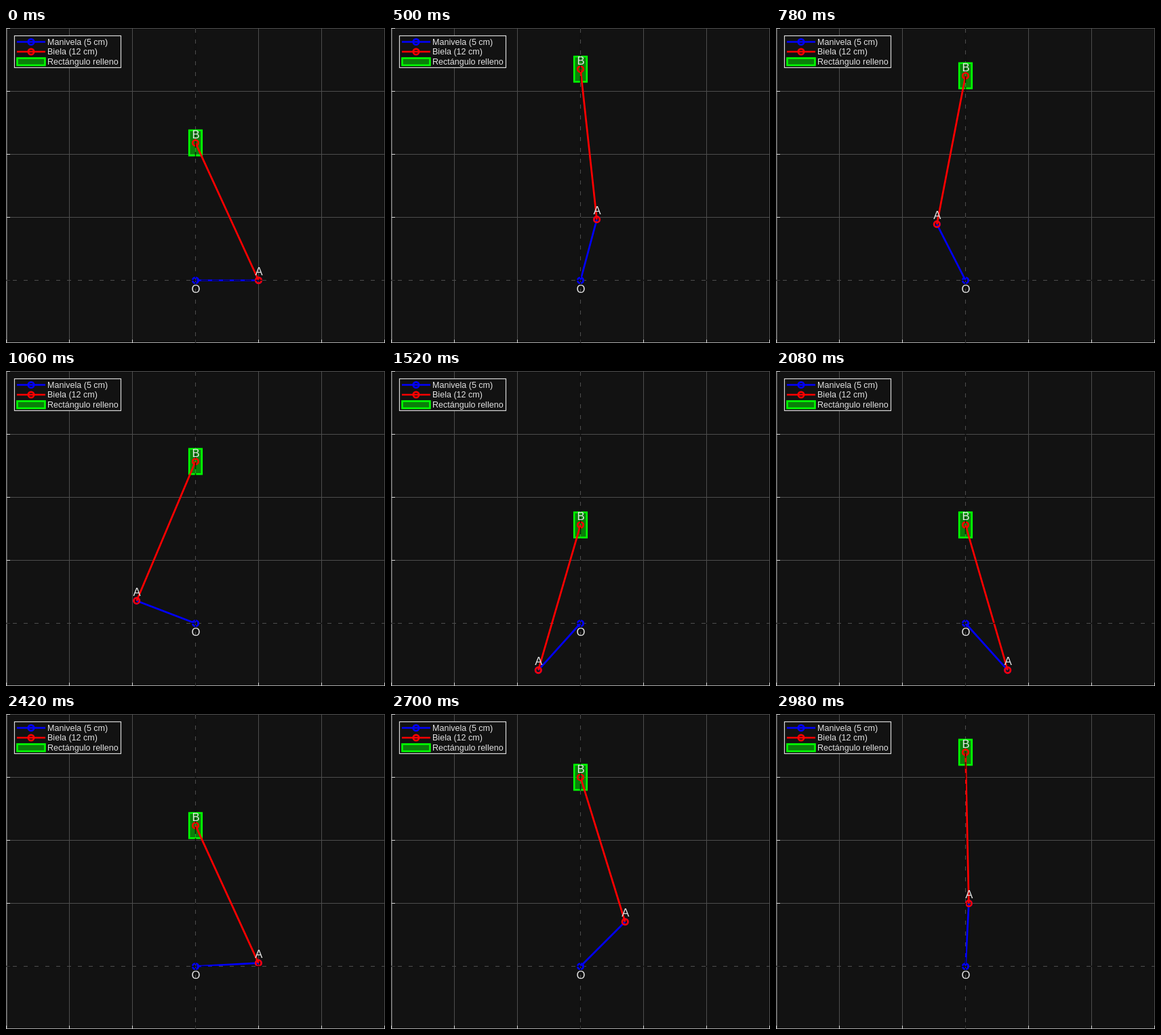
These frames come from a looping animation (559x465 px, 3 s). An HTML page with a canvas:

```html
<!DOCTYPE html>
<html lang="es">
<head>
<meta charset="utf-8">
<title>Biela-manivela</title>
<style>
html, body { margin: 0; width: 100%; height: 100%; overflow: hidden; background: #121212; }
canvas { display: block; }
</style>
</head>
<body>
<canvas id="stage" width="559" height="465"></canvas>
<script>
const W = 559, H = 465;
const LOOP = 3000, STEP = 20, DEG_PER_STEP = 3;
const CM = 18.6, CRANK = 5 * CM, ROD = 12 * CM;
const O = { x: 279.5, y: 372.5 };
const BLUE = '#00f', RED = '#f00', GREEN = '#0f0', INK = '#e3e3e3';
const ctx = document.getElementById('stage').getContext('2d');

function line(x1, y1, x2, y2, color, width) {
  ctx.strokeStyle = color;
  ctx.lineWidth = width;
  ctx.beginPath();
  ctx.moveTo(x1, y1);
  ctx.lineTo(x2, y2);
  ctx.stroke();
}

function ring(x, y, color) {
  ctx.strokeStyle = color;
  ctx.lineWidth = 2.7;
  ctx.beginPath();
  ctx.arc(x, y, 4.2, 0, Math.PI * 2);
  ctx.stroke();
}

function link(p, q, color) {
  line(p.x, p.y, q.x, q.y, color, 2.7);
  ring(p.x, p.y, color);
  ring(q.x, q.y, color);
}

function block(x, y, w, h) {
  ctx.fillStyle = 'rgba(0,255,0,.46)';
  ctx.fillRect(x, y, w, h);
  ctx.strokeStyle = GREEN;
  ctx.lineWidth = 2.6;
  ctx.strokeRect(x, y, w, h);
}

function label(text, x, y, size, align) {
  ctx.font = size + 'px "Liberation Sans", Arial, sans-serif';
  ctx.textAlign = align;
  ctx.fillStyle = INK;
  ctx.fillText(text, x, y);
}

function drawGrid() {
  ctx.fillStyle = '#121212';
  ctx.fillRect(0, 0, W, H);
  for (let i = 0; i <= 6; i++) {
    const p = i * 93 + 0.5;
    line(p, 0, p, H, '#4d4d4d', 1);
    line(0, p, W, p, '#4d4d4d', 1);
  }
  line(1, 0, 1, H, '#a8a8a8', 1);
  line(0, H - 0.5, W, H - 0.5, '#a8a8a8', 1);
  for (let i = 0; i <= 6; i++) {
    const p = i * 93 + 0.5;
    line(p, H - 5, p, H, '#d9d9d9', 1);
    line(1, p, 6, p, '#d9d9d9', 1);
  }
}

function drawAxes() {
  ctx.setLineDash([10, 6]);
  line(0, O.y, W, O.y, 'rgba(0,0,0,.75)', 1.5);
  line(O.x, H, O.x, 0, 'rgba(0,0,0,.75)', 1.5);
  ctx.setLineDash([]);
}

function drawLegend() {
  ctx.fillStyle = '#121212';
  ctx.fillRect(12.5, 11.5, 157, 47);
  ctx.strokeStyle = '#d9d9d9';
  ctx.lineWidth = 1.2;
  ctx.strokeRect(12.5, 11.5, 157, 47);
  [BLUE, RED].forEach((color, i) => {
    const y = 20.5 + i * 14.5;
    line(16, y, 58, y, color, 2.7);
    ring(37, y, color);
  });
  block(16.5, 44.5, 41, 10.5);
  ['Manivela (5 cm)', 'Biela (12 cm)', 'Rectángulo relleno'].forEach((text, i) =>
    label(text, 61, 24.7 + i * 14.6, 12.55, 'left'));
}

function draw(time) {
  const angle = Math.floor(time % LOOP / STEP) * DEG_PER_STEP * Math.PI / 180;
  const dx = CRANK * Math.cos(angle);
  const A = { x: O.x + dx, y: O.y - CRANK * Math.sin(angle) };
  const B = { x: O.x, y: A.y - Math.sqrt(ROD * ROD - dx * dx) };

  drawGrid();
  link(O, A, BLUE);
  block(B.x - CM / 2, B.y - CM, CM, 2 * CM);
  link(A, B, RED);
  drawAxes();
  label('O', O.x + 0.5, O.y + 18.5, 16.7, 'center');
  label('A', A.x + 0.5, A.y - 7.3, 16.7, 'center');
  label('B', B.x + 0.5, B.y - 6.8, 16.7, 'center');
  drawLegend();
}

const start = performance.now();
function tick() {
  draw(performance.now() - start);
  requestAnimationFrame(tick);
}
tick();
</script>
</body>
</html>
```
